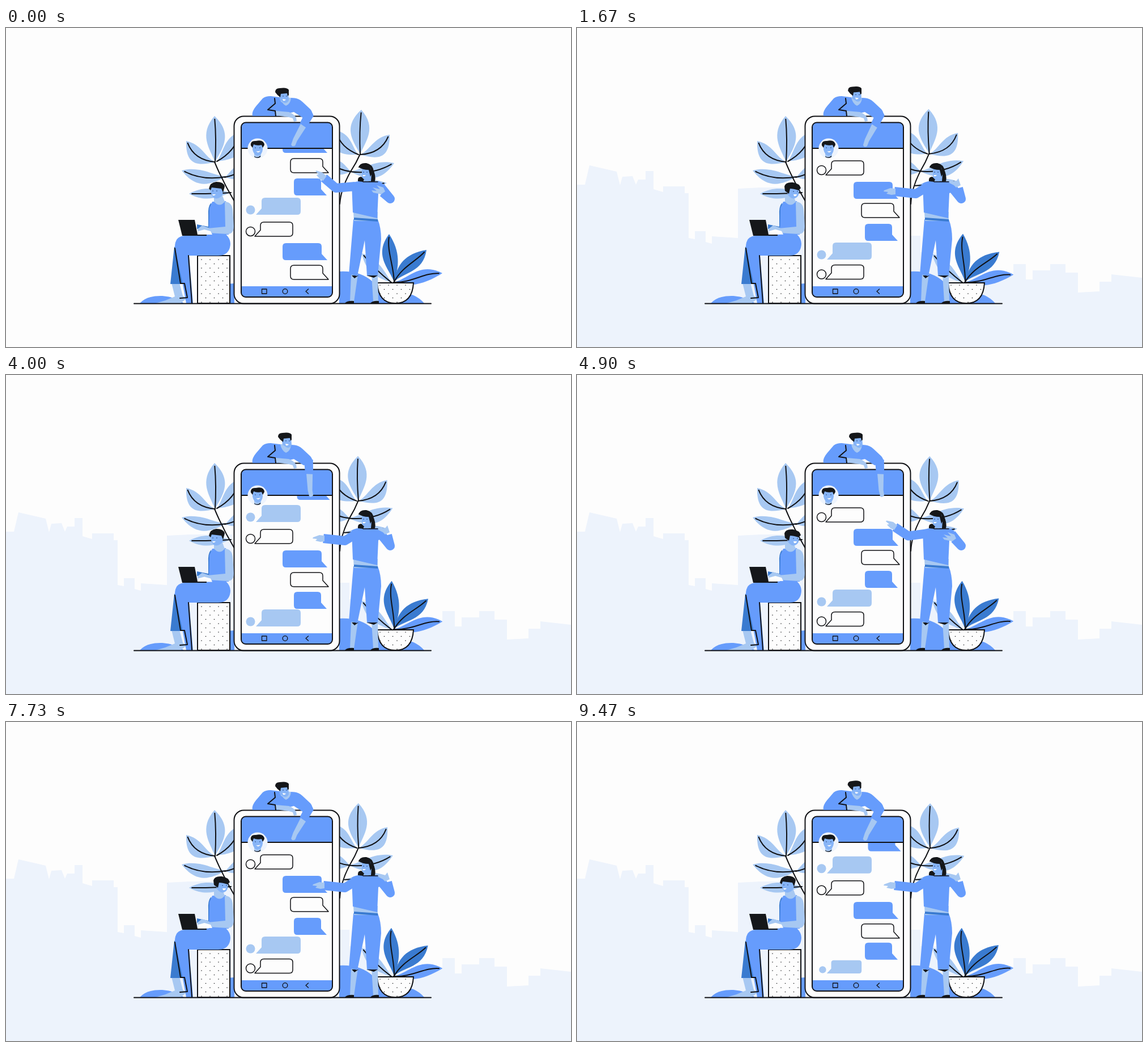
These frames come from a looping animation (997x562 px, 9510 ms). An HTML page:

```html
<!DOCTYPE html>
<html lang="en">
<head>
<meta charset="utf-8">
<title>Chat</title>
<style>
html, body { margin: 0; width: 100%; height: 100%; overflow: hidden; background: #fdfdfd; }
svg { display: block; width: 100%; height: 100%; }
.b { fill: #669cfc } .l { fill: #a7c8f2 } .d { fill: #3a7bd0 } .s { fill: #86b4f7 }
.k { fill: #15171a } .w { fill: #fdfdfd }
.ln { fill: none; stroke: #101114; stroke-width: 2; stroke-linecap: round; stroke-linejoin: round }
.thin { fill: none; stroke: #101114; stroke-width: 1.3; stroke-linecap: round; stroke-linejoin: round }
.eye { fill: none; stroke: #2b4a80; stroke-width: 1 }
.box { fill: #fdfdfd; stroke: #101114; stroke-width: 2; stroke-linejoin: round }
.outline { fill: #fdfdfd; stroke: #101114; stroke-width: 1.5; stroke-linejoin: round }
.dots { fill: url(#dots); stroke: #101114; stroke-width: 2 }
.sleeve { fill: none; stroke: #669cfc; stroke-width: 16; stroke-linejoin: round }
</style>
</head>
<body>
<svg id="stage" viewBox="0 0 997 562"></svg>
<script>
const LOOP = 9510, CYCLE = 2900, LEAN = 7900;
const $ = id => document.getElementById(id);
const clamp = x => Math.max(0, Math.min(1, x));
const ease = (t, from, to) => { const x = clamp((t - from) / (to - from)); return x * x * (3 - 2 * x); };
const mix = (a, b, k) => a + (b - a) * k;
const path = (cls, d) => `<path class="${cls}" d="${d}"/>`;
const group = (id, body) => `<g id="${id}">${body}</g>`;

// A leaf along a bent spine; near and far bend its lower and upper half sideways.
function leaf(cls, x0, y0, x1, y1, w, near = 0, far = near) {
  const n = Math.hypot(x1 - x0, y1 - y0), a = Math.atan2(y1 - y0, x1 - x0) * 180 / Math.PI;
  const low = s => `${.3 * n} ${near + s * w * .34}`, high = s => `${.6 * n} ${far + s * w * .9}`;
  return `<g transform="translate(${x0} ${y0}) rotate(${a})">` +
    path(cls, `M0 0C${low(1)} ${high(1)} ${n} 0C${high(-1)} ${low(-1)} 0 0`) +
    path('ln', `M0 0C${.35 * n} ${near} ${.65 * n} ${far} ${.93 * n} ${far * .12}`) + '</g>';
}

// Bubbles hang from y = 0 so they can grow from their bottom corner.
function bubble(x, w, h, left, cls) {
  const r = 6, e = x + w, top = -h;
  const d = left
    ? `M${x} ${top + r}Q${x} ${top} ${x + r} ${top}H${e - r}Q${e} ${top} ${e} ${top + r}V${-r}Q${e} 0 ${e - r} 0H${x - 10}L${x} -11Z`
    : `M${x + r} ${top}H${e - r}Q${e} ${top} ${e} ${top + r}V-11L${e + 10} 0H${x + r}Q${x} 0 ${x} ${-r}V${top + r}Q${x} ${top} ${x + r} ${top}Z`;
  return path(cls, d) + (left ? `<circle class="${cls}" cx="431.5" cy="-8.5" r="8"/>` : '');
}

// Each kind: its drawing and its bottom edge after every further message.
const kinds = [
  { art: bubble(449, 57, 25, true, 'outline'), y: [442.5, 405, 367, 332, 297, 259, 221, 183], ox: 440 },
  { art: bubble(488, 69, 30, false, 'b'), y: [443, 409, 375, 339, 301, 260, 220, 186], ox: 556 },
  { art: bubble(502, 57, 25, false, 'outline'), y: [443, 408, 373, 334, 295, 255, 217, 180], ox: 556 },
  { art: bubble(508, 48, 30, false, 'b'), y: [442, 412, 375, 335, 295, 255, 220, 180], ox: 556, drift: 5.5 },
  { art: bubble(451, 69, 30, true, 'l'), y: [443, 408, 368, 329, 294, 259, 208, 180], ox: 440 },
];
const popTimes = [0, 632, 1260, 2010, 2540], popLength = 200;   // kinds 3, 4, 0, 1, 2

const skyline = 'M0 276H14L22 242L70 253L76 277L80 262L98 261L104 276L108 267H121V252H135V284L152 289V279H190V291H197V370L208 372V358H227V377L238 380V367L284 370V283L325 281H400V366H606V395H645V438L770 434V416H792V443H804V427H835V416H862V431H884V466L922 464V447H943V434L997 440V562H0Z';

const leftPlant =
  leaf('l', 369, 236, 368, 155, 34, 2) + leaf('l', 369, 236, 318, 199, 27, -13) + leaf('l', 372, 235, 414, 182, 30, 10) +
  leaf('l', 388, 262, 310, 251, 24, -9) + leaf('l', 386, 263, 430, 240, 24, 5) + leaf('l', 397, 290, 323, 292, 18, -1) +
  path('ln', 'M404 307Q383 272 368 236');
const rightPlant =
  leaf('l', 625, 222, 627, 144, 34, -2) + leaf('l', 625, 223, 677, 188, 28, 13) + leaf('l', 622, 223, 581, 180, 30, -10) +
  leaf('l', 607, 253, 685, 238, 25, 9) + leaf('l', 609, 253, 570, 235, 24, -5) + leaf('l', 598, 278, 672, 273, 18, 2) +
  path('ln', 'M589 310Q591 283 608 253Q618 238 625 222');

const avatar =
  '<circle cx="444" cy="212" r="17.5" fill="#eef4fd"/>' +
  path('l', 'M438 219H450V227Q444 231 438 227Z') + path('s', 'M435 204H453L453 214Q452 224 444 225Q437 224 435 214Z') +
  path('k', 'M432 207Q431 198 441 199Q455 196 456 206L453 211L451 206Q443 208 437 205L435 211Z') +
  path('k', 'M438 226Q444 230 449 225V227Q444 231 438 227Z') +
  path('eye', 'M439 211H441M447 211H449') + path('w', 'M441 217Q445 218 449 216Q447 220 444 219Z');

const phone =
  '<rect class="box" x="402.5" y="155.5" width="186" height="330" rx="17"/>' +
  '<g clip-path="url(#screen)"><rect class="w" x="415" y="166" width="162" height="310"/>' + group('chat', '') +
  '<rect class="b" x="415" y="166" width="162" height="46"/><rect class="b" x="415" y="455" width="162" height="20"/>' +
  path('ln', 'M415 212H577') + '</g>' +
  '<rect class="ln" x="415" y="166.5" width="161" height="307.5" rx="8"/>' +
  '<rect class="thin" x="451.5" y="460" width="8.5" height="8"/><circle class="thin" cx="492.5" cy="464" r="4.3"/>' +
  path('thin', 'M533.5 460L529 464L533.5 468') + avatar;

const leaner =
  path('b', 'M435 155Q433 148 441 138L453 124Q458 120 467 120L483 122L503 123Q516 123 523 130L537 143Q542 149 541 157L525 159L508 148L478 155Z') +
  path('l', 'M484 122L503 123Q502 134 494 137Q486 133 484 122Z') +
  path('l', 'M476 146L499 148Q508 151 512 158L513 164L508 165L506 159L499 157L476 154Z') +
  path('ln', 'M474 124L475 133L462 144L475 146L476 155') +
  group('leanArm', path('b', 'M526 148Q534 143 542 150L541 174L527 173Z') +
    path('l', 'M529 174L540 175L538 203L539 212Q536 217 532 214L530 203Z')) +
  group('leanHead', path('l', 'M483 119L494 124L494 134L485 130Z') +
    path('s', 'M481 112L498 113L499 127Q497 133 491 132L483 127Z') +
    path('k', 'M475 113Q475 106 483 106Q496 104 499 109L499 118L497 120L496 115L485 116L484 122L479 118Z') +
    path('w', 'M488 125L494 126Q492 129 489 128Z') + path('eye', 'M488 120H490M494 120H496'));

const sitter =
  path('l', 'M292 449H306L312 472L318 477L308 485H264L281 480L298 473Z') +
  path('d', 'M297 385L290 451H312L306 395Z') +
  path('b', 'M298 386Q298 367 315 366L386 362Q399 372 395 387Q391 401 374 401H323L330 485H318L312 452Z') +
  path('ln', 'M298 388L308 450H315L320 475L307 476M322 401L328 484') +
  path('d', 'M362 308Q356 314 357 330V350L337 346V354L363 360Z') +
  path('b', 'M364 306L388 305L393 364H358L359 317Z') +
  path('l', 'M367 293H381L386 306Q377 317 367 306Z') +
  path('l', 'M386 306Q398 306 400 320L402 349Q402 363 391 363L357 361L356 353L387 350Z') +
  group('sitDown', path('s', 'M361 281H384L382 294Q376 302 368 300Q361 297 361 282Z') +
    path('k', 'M358 283Q360 272 371 271Q384 271 386 279L383 290L380 283L363 281L361 286Z') +
    path('w', 'M364 293H370Q368 296 365 295Z') + path('eye', 'M364 287H366M371 287H373')) +
  group('sitUp', path('s', 'M370 281H392L391 294Q387 302 379 300Q370 296 370 282Z') +
    path('k', 'M366 279Q368 271 381 272Q393 274 395 282L391 286Q382 283 376 283L374 292L367 287Z') +
    path('w', 'M382 293H388Q387 297 383 296Z') + path('eye', 'M381 288H383M388 288H390')) +
  group('typing', path('l', 'M338 354L346 348L358 352L364 361L350 364L339 361Z') +
    path('w', 'M339 358L350 355L361 358L364 364H340Z')) +
  path('k', 'M304 338H333L338 364H354V366H311Z');

const woman =
  path('l', 'M609 434H621L614 482H607ZM645 434H656L657 482H648Z') +
  path('k', 'M610 436H622L615 441ZM636 436H656L649 440ZM598 485Q602 480 614 481V486H599ZM643 485Q647 480 658 481V486H644Z') +
  path('b', 'M613 337H656Q662 352 662 372L656 436H637L633 374L620 437L605 434L609 385Z') +
  path('l', 'M613 324H656L656 340H614Z') + path('d', 'M614 334L656 337V341L614 338Z') +
  path('b', 'M610 274Q618 269 633 270H657Q667 272 670 286L657 291L655 335Q633 330 612 325Z') +
  '<path id="backSleeve" class="sleeve"/><path id="pointSleeve" class="sleeve"/>' +
  group('pointHand', path('l', 'M2 -5L-7 -6L-18 -2L-19 0L-11 1L-14 4L-5 6L2 5Z')) +
  group('handChest', path('l', 'M669 288L662 293L648 290L645 286L654 287L647 281L660 284L654 277L666 281Z')) +
  group('handOpen', path('l', 'M670 283L678 279L674 267L670 273L666 268L667 274L661 276Z')) +
  group('handPoint', path('l', 'M669 281L677 277L673 265L669 270L656 269L657 273L665 277Z')) +
  path('k', 'M622 246Q624 237 636 238Q647 240 649 252Q653 262 651 270L640 271L641 246Z') +
  path('s', 'M628 246H643L645 258L644 270H633L628 264Z') +
  path('k', 'M622 245Q628 237 641 241L646 256L643 262L640 250Q629 250 622 245ZM621 270Q620 262 627 262L632 267L630 271Z') +
  path('w', 'M629 259H635Q633 262 630 261Z') + path('eye', 'M630 254H632M636 254H638') + path('thin', 'M630 271H656');

const pot =
  group('potLight', leaf('l', 681, 449, 628, 397, 20, -3)) + group('potLow', leaf('b', 684, 448, 770, 432, 23, 7, -7)) +
  group('potTall', leaf('d', 685, 447, 676, 363, 27, 2, -7) + leaf('d', 685, 447, 742, 391, 26, -9, 1)) +
  path('w', 'M655 449H719Q717 485 687 485Q657 485 655 449Z') + path('dots', 'M655 449H719Q717 485 687 485Q657 485 655 449Z');

$('stage').innerHTML =
  `<defs><clipPath id="screen"><rect x="415" y="166.5" width="161" height="307.5" rx="8"/></clipPath>
  <pattern id="dots" width="15" height="15" x="341" y="404" patternUnits="userSpaceOnUse">
  <circle class="k" cx="4" cy="4" r=".8"/><circle class="k" cx="11.5" cy="11.5" r=".8"/></pattern></defs>` +
  `<path id="skyline" fill="#edf3fc" d="${skyline}"/>` +
  path('b', 'M236 485Q248 471 276 472Q300 474 314 485ZM350 485Q370 450 403 450V485ZM588 429Q625 427 647 447Q658 460 681 466Q720 463 738 485H588Z') +
  leftPlant + group('rightPlant', rightPlant) + phone + leaner +
  '<rect class="w" x="338" y="401" width="57" height="84"/><rect class="dots" x="338" y="401" width="57" height="84"/>' +
  sitter + pot + woman + path('ln', 'M226 485.5H750');

const copies = kinds.map(kind => [0, 1].map(() => {
  const g = document.createElementNS('http://www.w3.org/2000/svg', 'g');
  g.innerHTML = kind.art;
  $('chat').append(g);
  return g;
}));

const move = (id, value) => $(id).setAttribute('transform', value);
const show = (id, on) => { $(id).style.display = on ? '' : 'none'; };

function drawChat(phase) {
  // Messages since the first one of the cycle; kind 2 is already in place at zero.
  const count = popTimes.reduce((sum, start) => sum + ease(phase, start, start + popLength), 2);
  kinds.forEach((kind, i) => {
    const newest = ((count - i + 1) % 5 + 5) % 5;     // 0 = not yet there, 1 = settled
    copies[i].forEach((g, older) => {
      const age = newest + older * 5 - 1;
      const scale = clamp(age + 1);
      const slot = Math.max(0, Math.min(6.99, age)), n = Math.floor(slot);
      const y = mix(kind.y[n], kind.y[n + 1], slot - n);
      const dx = (kind.drift || 0) * clamp(age - 4);
      g.style.display = scale < .01 || age >= 7 ? 'none' : '';
      g.setAttribute('transform', `translate(${kind.ox + dx} ${y}) scale(${scale}) translate(${-kind.ox} 0)`);
    });
  });
}

function drawWoman(phase) {
  const up = ease(phase, 1930, 2025) + 1 - ease(phase, 40, 180);
  const ex = mix(598, 582, up), ey = mix(292, 282, up), wx = mix(560, 561, up), wy = mix(288, 264, up);
  $('pointSleeve').setAttribute('d', `M616 ${mix(281, 279, up)}L${ex} ${ey}L${wx} ${wy}`);
  move('pointHand', `translate(${wx} ${wy}) rotate(${mix(0, 38, up)})`);
  $('backSleeve').setAttribute('d', `M661 280L678 301L${mix(673, 665, up)} ${mix(282, 290, up)}`);
  show('handChest', up > .5);
  show('handOpen', up <= .5 && phase < 480);
  show('handPoint', up <= .5 && phase >= 480);
}

function draw(t) {
  const phase = t % CYCLE, lean = t % LEAN;
  const sway = (1 - Math.cos(phase / CYCLE * 2 * Math.PI)) / 2;
  show('skyline', t >= 30);
  drawChat(phase);
  drawWoman(phase);

  move('rightPlant', `rotate(${-2.4 * sway} 590 308)`);
  move('potTall', `rotate(${3.6 * sway} 685 448)`);
  move('potLow', `rotate(${1.8 * sway} 685 448)`);
  move('potLight', `rotate(${-sway} 681 448)`);

  const lift = ease(lean, 700, 2400) * (1 - ease(lean, 6000, 7730));
  const swing = ease(lean, 2000, 3400) * (1 - ease(lean, 5000, 5950));
  move('leanHead', `translate(${5 * lift} ${-4 * lift})`);
  move('leanArm', `rotate(${29 - 3 * lift - 29 * swing} 534 154)`);

  const lookUp = phase > 1220 && phase < 2450;
  show('sitUp', lookUp);
  show('sitDown', !lookUp);
  move('typing', `translate(0 ${1.2 * Math.sin(t / 90)})`);
}

const begin = performance.now();
function tick() {
  draw((performance.now() - begin) % LOOP);
  requestAnimationFrame(tick);
}
tick();
</script>
</body>
</html>
```
